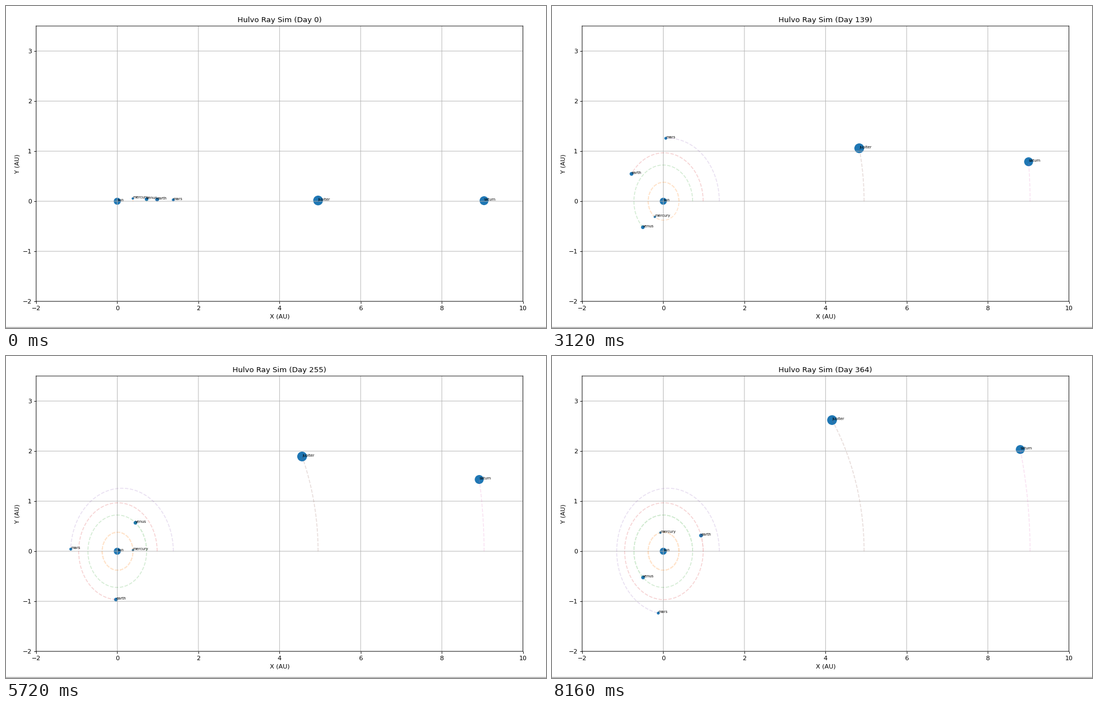
These frames come from a looping animation (968x579 px, 8190 ms). A matplotlib script:

```python
import numpy as np
import matplotlib.pyplot as plt
from matplotlib.animation import FuncAnimation
from matplotlib.lines import Line2D

W, H, DPI = 968, 579, 80
FRAMES, INTERVAL = 546, 15
DAYS = 365
YEAR = 365.25
LEFT, RIGHT, TOP, BOTTOM = 54, 926.7, 36, 531.1

# name, aphelion (AU), semi-major axis (AU), dot diameter (px)
PLANETS = [
    ("mercury", 0.387, 0.3795, 4.2),
    ("venus", 0.7235, 0.7233, 6.6),
    ("earth", 0.983, 0.9672, 6.8),
    ("mars", 1.381, 1.264, 5.2),
    ("jupiter", 4.950, 4.749, 17.5),
    ("saturn", 9.041, 8.684, 16.0),
]
SUN_SIZE = 12.6


def orbit(far, a):
    """Daily positions on a Kepler ellipse, starting at aphelion on +x."""
    e = far / a - 1
    mean = np.pi + 2 * np.pi * np.arange(DAYS + 2) / (YEAR * a ** 1.5)
    ecc = mean.copy()
    for _ in range(12):
        ecc = mean + e * np.sin(ecc)
    return np.column_stack([a * (e - np.cos(ecc)),
                            -a * np.sqrt(1 - e * e) * np.sin(ecc)])


paths = [np.zeros((DAYS + 2, 2))] + [orbit(far, a) for _, far, a, _ in PLANETS]
names = ["sun"] + [p[0] for p in PLANETS]
sizes = np.array([SUN_SIZE] + [p[3] for p in PLANETS]) * 72 / DPI

plt.rcParams["path.snap"] = False  # soft lines at sub-pixel positions
fig = plt.figure(figsize=(W / DPI, H / DPI), dpi=DPI, facecolor="white")
ax = fig.add_axes([LEFT / W, 1 - BOTTOM / H,
                   (RIGHT - LEFT) / W, (BOTTOM - TOP) / H])
ax.set(xlim=(-2, 10), ylim=(-2, 3.5), xlabel="X (AU)", ylabel="Y (AU)")
ax.grid(True)
title = ax.set_title("")
fig.add_artist(Line2D([0, 1], [1 / H] * 2, color="#7f7f7f", lw=0.9))

dots = ax.scatter(np.zeros(7), np.zeros(7), s=sizes ** 2, c="C0", linewidths=0)
trails = [ax.plot([], [], "--", color=f"C{i}", alpha=0.2)[0]
          for i in range(1, 7)]
labels = [ax.text(0, 0, name, fontsize=6) for name in names]


def update(i):
    day = min(int(i * DAYS / FRAMES + 0.55), DAYS - 1)
    spots = np.array([path[day + 2] for path in paths])
    dots.set_offsets(spots)
    for label, spot in zip(labels, spots):
        label.set_position(spot)
    for trail, path in zip(trails, paths[1:]):
        trail.set_data(*path[:day + 2].T)
    title.set_text(f"Hulvo Ray Sim (Day {day})")
    return [dots, title, *trails, *labels]


anim = FuncAnimation(fig, update, frames=FRAMES, interval=INTERVAL,
                     repeat=True, repeat_delay=0, blit=False)
plt.show()
```
